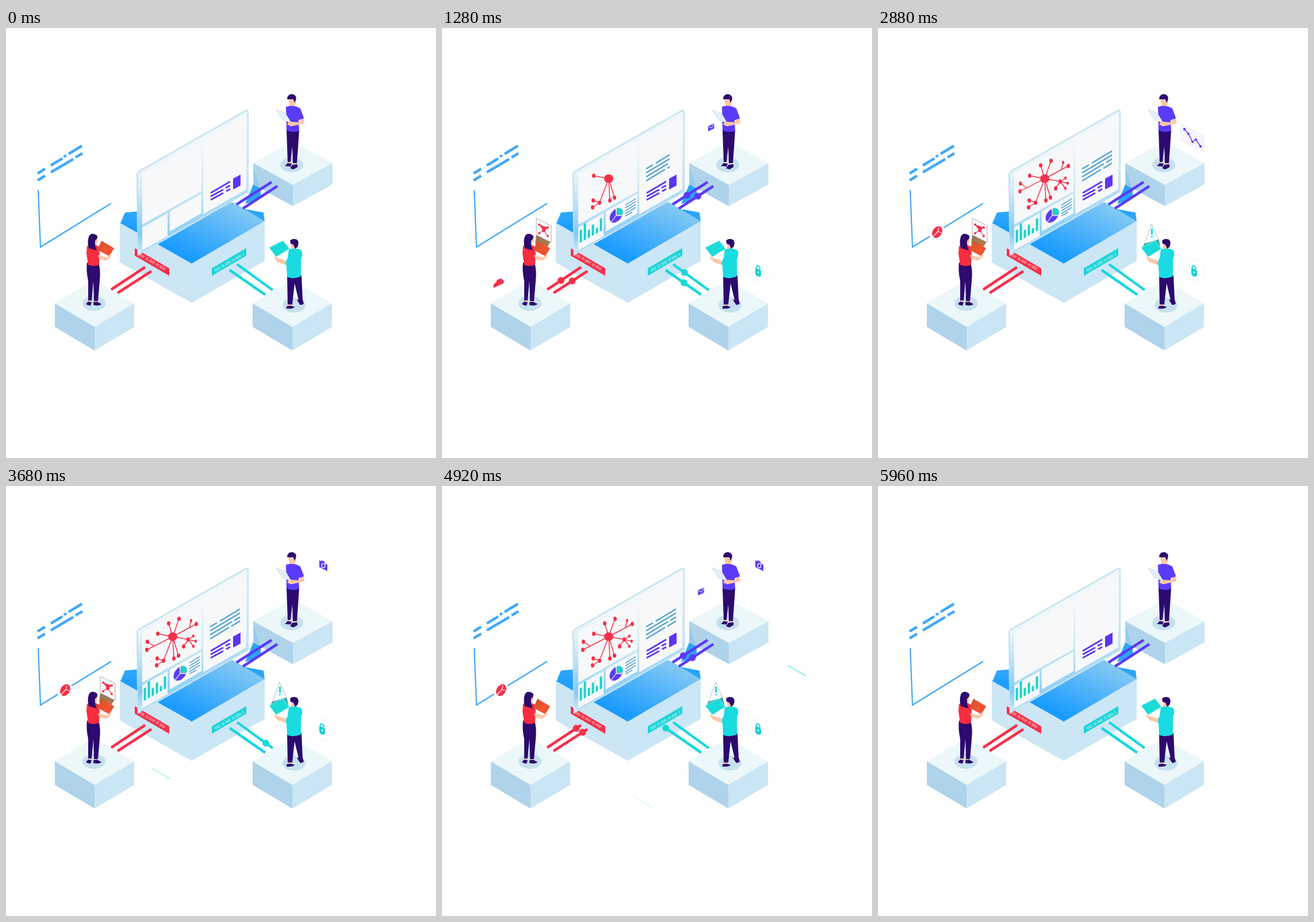
These frames come from a looping animation (748 by 748 pixels, 6 s). An HTML page:

```html
<!DOCTYPE html>
<html lang="en">
<head>
<meta charset="utf-8">
<title>Isometric dashboard</title>
<style>
html, body { margin: 0; width: 100%; height: 100%; overflow: hidden; background: #fff; }
svg { display: block; width: 100vw; height: 100vh; }
.line { fill: none; }
.pop { transform-box: fill-box; transform-origin: center; }
.grow { transform-origin: 290px 262px; }
.bar { transform-box: fill-box; transform-origin: bottom; }
.red { stroke: #f5304a; } .cyan { stroke: #19d7dc; } .violet { stroke: #5b3bf5; }
.skin { fill: #fdc6a6; } .dark { fill: #2c0a6e; }
</style>
</head>
<body>
<svg viewBox="0 0 748 748">
<defs>
  <linearGradient id="top" gradientUnits="userSpaceOnUse" x1="385" y1="298" x2="335" y2="405">
    <stop offset="0" stop-color="#86caf3"/><stop offset="1" stop-color="#1a9cff"/>
  </linearGradient>
  <linearGradient id="frame" gradientUnits="userSpaceOnUse" x1="310" y1="215" x2="345" y2="335">
    <stop offset="0" stop-color="#f1f7fa"/><stop offset=".5" stop-color="#d3eaf5"/><stop offset="1" stop-color="#93d2f7"/>
  </linearGradient>
  <linearGradient id="edge" x1="0" y1="0" x2="0" y2="1">
    <stop offset="0" stop-color="#d3eaf5" stop-opacity="0"/><stop offset=".75" stop-color="#7fcbf9"/><stop offset="1" stop-color="#d8eefa"/>
  </linearGradient>
  <linearGradient id="ember" x1="0" y1="0" x2="1" y2="1">
    <stop offset="0" stop-color="#c8502c"/><stop offset=".6" stop-color="#f2552f"/><stop offset="1" stop-color="#d64a34"/>
  </linearGradient>
  <linearGradient id="beam" x1="0" y1="0" x2="0" y2="1">
    <stop offset="0" stop-color="#8a7a5c"/><stop offset="1" stop-color="#c07a45"/>
  </linearGradient>
</defs>

<!-- side panel -->
<g class="line" stroke="#41a8fa">
  <path d="M56 282L60 381L183 305" stroke-width="2.2"/>
  <path d="M55 253L68 245M78 239L98 227M109 219L132 205M55 265L68 257M78 251L117 228M121 225L133 218" stroke-width="4.500"/>
  <path d="M100.500 224L105 221.500" stroke-width="4"/>
</g>

<g id="dashes" fill="none" stroke="#3fd9da" stroke-width="1.500"></g>

<!-- centre box -->
<g>
  <path d="M431 270L443 277V297L416 306Z" fill="#2ba5f8"/>
  <path d="M200 337L207 321L230 319V334ZM400 312L448 321L450 336Z" fill="#2ba5f8"/>
  <path d="M198 339L228 321L395 303L450 336L323 410Z" fill="url(#top)"/>
  <path d="M198 339L323 410V478L198 408Z" fill="#cce6f3"/>
  <path d="M450 336L323 410V478L450 405Z" fill="#cbe6f5"/>
  <path d="M224 383L284 418V431L224 396Z" fill="#f5304a"/>
  <path d="M231 393L279 421" class="line" stroke="#f77485" stroke-width="5" stroke-dasharray="11 3 5 2"/>
  <path d="M358 418L418 383V396L358 431Z" fill="#19d5d9"/>
  <path d="M363 422L414 393" class="line" stroke="#66dfe1" stroke-width="5" stroke-dasharray="11 3 5 2"/>
</g>
<g id="platforms"></g>
<path d="M431 243L442 278L431 271Z" fill="#94cbee"/>
<g id="links" class="line" stroke-width="4.600"></g>
<g id="dots"></g>

<!-- screen -->
<path d="M228 256Q228 252 232 249L417 144Q421 142 421 147V285L230 394Z" fill="url(#frame)" stroke="#c7e3f1" stroke-width="2.600"/>
<path d="M228 254L237 251V387L230 394Z" fill="url(#edge)"/>
<g fill="#f7f8f9">
  <path d="M237 254L340 197V284L237 342ZM343 195L418 151V281L343 324Z"/>
  <path d="M237 347L281 322V362L237 387ZM285 319L340 288V322L285 354Z"/>
</g>
<g class="violet" stroke-width="3">
  <path d="M356 287L390 267M356 293L378 281M382 278L390 274M356 299L378 287M383 284L390 280"/>
  <path d="M395 262L408 255V274L395 281Z" fill="#5b35f7" stroke="none"/>
</g>
<g id="bars" fill="#1dd3c8"></g>
<g id="pie">
  <g transform="translate(303 326) skewY(-24)">
    <circle r="11.500" fill="#5b3bf5"/>
    <path d="M1 -1V-12A12 12 0 0 1 11 4Z" fill="#21d3c4"/>
    <path d="M0 0V-12M0 0L11 5M0 0L-9 8" stroke="#f7f8f9" stroke-width="1.500"/>
  </g>
</g>
<path id="notes" d="M319 308L337 297M319 313L337 302M319 318L337 307M319 323L337 312M319 327L331 320" stroke="#62abd5" stroke-width="2"/>
<path id="copy" d="M355 245L367 238M372 235L407 214M355 252L407 221M355 259L393 236M397 234L407 228M355 266L388 246M392 244L407 235" fill="none" stroke="#53a3d1" stroke-width="2.600"/>
<g id="net" class="red" fill="#f5304a" stroke-width="1.500"></g>

<g id="mail"><path d="M-5 -1L5.500 -6V3L-5 8Z" fill="#5b3bf5"/><path d="M-4 0L1 2L5 -5" fill="none" stroke="#fff"/></g>

<!-- woman with laptop -->
<g>
  <ellipse cx="153" cy="479" rx="20" ry="13" fill="#c6e0ef"/>
  <path class="skin" d="M144 470h5v10h-5zM153 470h6v10h-6zM155 363q6 2 4 8l-2 7h-6v-12z"/>
  <path class="dark" d="M141 408L161 409Q165 420 163 440L160 475H153L152 440L149 474H143L143 440Q139 422 141 408ZM143 476L149 477L147 483Q141 482 139 480ZM152 477L158 476L166 480Q163 484 152 482Z"/>
  <path d="M141 379Q152 374 161 380L163 392L162 412Q152 416 143 412L140 392Z" fill="#f62d3f"/>
  <path class="dark" d="M144 363Q147 356 155 359Q161 361 158 367L155 370Q154 380 158 387L144 383Q141 372 144 363Z"/>
  <g id="holoRed">
    <path d="M164 359L189 372L181 384L162 375Z" fill="url(#beam)"/>
    <path d="M164 331L190 344V373L164 360Z" fill="#fafafa" stroke="#a9adb1"/>
    <g class="red" fill="#f5304a" stroke-width="1.200">
      <path d="M169 342L177 352L184 347M177 352L169 357M177 352L184 362"/>
      <circle cx="177" cy="352" r="3" stroke="none"/><circle cx="169" cy="342" r="1.300"/><circle cx="184" cy="347" r="1.300"/><circle cx="169" cy="357" r="1.300"/><circle cx="184" cy="362" r="1.300"/>
    </g>
  </g>
  <path d="M166 370L188 383L180 397L159 386Z" fill="url(#ember)"/>
  <path class="skin" d="M160 395L176 399L184 390L182 399L174 405L162 402Z"/>
</g>

<!-- man with paper -->
<g>
  <ellipse cx="497" cy="238" rx="20" ry="13" fill="#c6e0ef"/>
  <path class="skin" d="M490 228h5v9h-5zM499 230h6v9h-6zM491 124L504 121V131L501 138H494Z"/>
  <path class="dark" d="M488 177L510 178L508 208L506 235H499L498 206L495 233H490L489 205ZM490 235L497 236L495 241L485 240ZM498 238L507 237V242L500 246L494 244Z"/>
  <path d="M487 137Q501 133 512 140L518 156L516 160L509 160L510 179Q498 183 488 178Z" fill="#5b3bfa"/>
  <path class="dark" d="M489 124Q489 115 498 115Q507 117 504 126L502 130L500 124Z"/>
  <path d="M469 142L486 148L496 165L481 160Z" fill="#e2eef9" stroke="#cbdff2" stroke-width=".7"/>
  <path class="skin" d="M511 159L518 158L519 166L496 171L489 168L492 163L511 164Z"/>
</g>

<!-- man with tablet -->
<g>
  <ellipse cx="501" cy="482" rx="20" ry="13" fill="#c6e0ef"/>
  <path class="skin" d="M490 476h6v9h-6zM508 470h6v8h-6zM495 373L504 376L503 387H497Z"/>
  <path class="dark" d="M489 430L514 430L516 473H509L502 444L498 481H490ZM488 484L495 483L502 485Q500 489 488 488ZM506 473L516 472L518 480L512 482Z"/>
  <path d="M492 385Q506 381 514 387Q517 393 513 403L513 432Q501 438 489 433L488 413L485 409L490 400Z" fill="#1adbe1"/>
  <path class="dark" d="M494 370Q498 365 506 368Q511 372 507 381L503 384L500 377L495 375Z"/>
  <g id="holoCyan">
    <path d="M464 373L488 366L491 380L469 394L460 382Z" fill="#3aa9ab"/>
    <path d="M476 341L488 368L464 375Z" fill="#f7fcfc" stroke="#a9c9ca"/>
    <path d="M476.500 349V359M476.500 361.500V364" class="cyan" stroke-width="3"/>
  </g>
  <path d="M458 382L482 370L493 384L470 398Z" fill="#19dcd8" stroke="#8cebe7"/>
  <path class="skin" d="M465 397L475 401L488 405L486 412L472 407Z"/>
</g>

<!-- floating badges -->
<g id="cloud" class="pop">
  <circle cx="99" cy="444" r="15" fill="#fff"/>
  <path d="M90 452Q88 445 94 443Q95 436 100 437Q104 434 105 438Q109 439 107 444Z" fill="#f5304a"/>
</g>
<g id="chart" class="pop">
  <circle cx="103" cy="356" r="14" fill="#fff"/>
  <ellipse cx="103" cy="355" rx="8" ry="11" transform="rotate(32 103 355)" fill="#f5304a"/>
  <path d="M96 363L104 354L106 347M104 354L110 356" class="line" stroke="#fff" stroke-width="1.200"/>
</g>
<g id="lock" class="pop">
  <ellipse cx="552" cy="423" rx="15.500" ry="20" fill="#fff" stroke="#f4f5f6" transform="rotate(-15 552 423)"/>
  <path d="M546.500 420V417Q547 412 550.500 414Q553 416 553 421" class="line cyan" stroke-width="2"/>
  <path d="M545 418Q550 418 555 423V430Q553 434 549 432Q545 430 545 426Z" fill="#19cfd5"/><circle cx="550" cy="425" r="1.600" fill="#fff"/>
</g>
<g id="camera" class="pop">
  <ellipse cx="552" cy="138" rx="14" ry="18" fill="#fff" stroke="#f6f6f8" transform="rotate(-15 552 138)"/>
  <path d="M545 129L548 131L549 129L554 132L555 135L559 137V148L545 141Z" fill="#5b3bf5"/>
  <ellipse cx="552" cy="138.500" rx="3" ry="3.600" fill="#5b3bf5" stroke="#fff" stroke-width="1.300"/>
</g>
<g id="graph" class="pop">
  <path d="M527 167L567 188V215L527 196Z" fill="#f4f6fc" stroke="#eaeef7"/>
  <path d="M533 176L540 184L547 198L553 194L561 206" class="line violet" stroke-width="1.500"/>
  <g fill="#5b3bf5"><circle cx="533" cy="176" r="2.200"/><circle cx="540" cy="184" r="2"/><circle cx="547" cy="198" r="2"/><circle cx="553" cy="194" r="2"/><circle cx="561" cy="206" r="2.200"/></g>
</g>
</svg>
<script>
const LOOP = 6000;
const $ = id => document.getElementById(id);

function add(parent, tag, attrs) {
  const el = document.createElementNS('http://www.w3.org/2000/svg', tag);
  for (const key in attrs) el.setAttribute(key, attrs[key]);
  return parent.appendChild(el);
}

// steps: [time in ms, properties]
function play(el, steps) {
  const frames = steps.map(([t, props]) => ({ offset: t / LOOP, ...props }));
  const first = frames[0], last = frames[frames.length - 1];
  if (first.offset > 0) frames.unshift({ ...first, offset: 0 });
  if (last.offset < 1) frames.push({ ...last, offset: 1 });
  el.animate(frames, { duration: LOOP, iterations: Infinity, delay: 20, fill: 'backwards' });
}

function show(el, from, to, off = { opacity: 0 }, on = { opacity: 1 }, time = 200) {
  play(el, [[from, { ...off, easing: 'ease-out' }], [from + time, on], [to, on], [Math.min(to + time, LOOP), off]]);
}

const small = { opacity: 0, transform: 'scale(.2)' };
const full = { opacity: 1, transform: 'scale(1)' };
const shift = (x, y) => `translate(${x}px, ${y}px)`;

// platforms: x, y of the top's centre, half height, depth
for (const [x, y, h, d] of [[154, 479, 41, 41], [499, 235, 38, 37], [498, 479, 41, 41]]) {
  const face = (path, fill) => add($('platforms'), 'path', { d: path, fill });
  face(`M${x - 69} ${y}L${x} ${y - h}L${x + 69} ${y}L${x} ${y + h}Z`, '#ecf7f9');
  face(`M${x - 69} ${y}L${x} ${y + h}v${d}l-69 ${-h}Z`, '#afd3ea');
  face(`M${x + 69} ${y}L${x} ${y + h}v${d}l69 ${-h}Z`, '#cae5f4');
}

// links: colour, outer end, inner end, two runs of the travelling dot
const links = [
  ['red', 183, 455, 242, 416, 700, 2080, 3700, 5100],
  ['red', 194, 461, 253, 423, 350, 2000, 3700, 5100],
  ['cyan', 451, 464, 389, 421, 450, 2130, 3700, 4840],
  ['cyan', 464, 456, 402, 411, 450, 1640, 3430, 4620],
  ['violet', 462, 268, 401, 307, 450, 1830, 3950, 5320],
  ['violet', 472, 275, 412, 314, 700, 1950, 4180, 5370]
];
const tint = { red: '#f5304a', cyan: '#19d7dc', violet: '#5b3bf5' };
for (const [name, x, y, bx, by, ...runs] of links) {
  add($('links'), 'path', { d: `M${x} ${y}L${bx} ${by}`, class: name });
  const dot = add($('dots'), 'circle', { r: 6, fill: tint[name] });
  const a = shift(x, y), b = shift(bx, by), steps = [];
  for (const i of [0, 2]) {
    const [from, to] = [runs[i], runs[i + 1]];
    steps.push([from, { opacity: 0, transform: a }], [from + 1, { opacity: 1, transform: a }],
      [to, { opacity: 1, transform: b }], [to + 90, { opacity: 1, transform: b }],
      [to + 91, { opacity: 0, transform: b }]);
  }
  play(dot, steps);
}

// drifting dashes: path, start, end, shift at start, shift at end
for (const [d, from, to, ax, ay, bx, by] of [
  ['M78 441L109 460', 1760, 2520, -21, -13, 30, 18],
  ['M254 491L286 510', 3240, 5120, -29, -18, 95, 59],
  ['M560 287L591 305', 4440, 5760, 75, 45, -20, -12],
  ['M516 465L547 446', 4000, 4600, 24, -15, -16, 10]
]) {
  play(add($('dashes'), 'path', { d }), [
    [from, { opacity: 0, transform: shift(ax, ay) }],
    [(from + to) / 2, { opacity: 1, transform: shift((ax + bx) / 2, (ay + by) / 2) }],
    [to, { opacity: 0, transform: shift(bx, by) }]]);
}

// bar chart
[22, 29, 14, 19, 9, 22].forEach((h, i) => {
  const x = 239.5 + i * 7, y = 374 - i * 4;
  const bar = add($('bars'), 'path', { d: `M${x} ${y - h}l4 -2v${h}l-4 2Z`, class: 'bar' });
  play(bar, [[300 + i * 90, { transform: 'scaleY(0)' }], [650 + i * 90, { transform: 'scaleY(1)' }]]);
});

// network branches: start, edges, nodes as x, y, radius
const branches = [
  [650, 'M290 262L264 257', [[264, 257, 3]]],
  [800, 'M290 262L292 300M290 262L300 295', [[292, 300, 3], [300, 295, 3]]],
  [900, 'M290 262L274 304L263 300M274 304L262 312', [[274, 304, 3], [263, 300, 3], [262, 312, 3]]],
  [1340, 'M290 262L283 239M290 262L301 231', [[283, 239, 3], [301, 231, 3]]],
  [1640, 'M290 262L331 240M319 246L322 234', [[331, 240, 3], [322, 234, 2]]],
  [2200, 'M290 262L317 267L326 261M317 267L330 270M317 267L309 279M317 267L326 279', [[317, 267, 3], [326, 261, 2], [330, 270, 2], [309, 279, 3], [326, 279, 2]]],
  [2600, 'M290 262L245 285M258 279L246 271', [[245, 285, 3], [246, 271, 3]]]
];
for (const [start, d, nodes] of branches) {
  const g = add($('net'), 'g', { class: 'grow' });
  add(g, 'path', { d, fill: 'none' });
  for (const [cx, cy, r] of nodes) add(g, 'ellipse', { cx, cy, rx: r, ry: r + .8, stroke: 'none' });
  show(g, start, 5600, small, full, 320);
}
show(add($('net'), 'ellipse', { cx: 290, cy: 262, rx: 8, ry: 7.5, class: 'grow', stroke: 'none' }), 450, 5640, small, full, 240);

show($('pie'), 750, 5560);
show($('notes'), 900, 5560);
const shut = { clipPath: 'inset(0 100% 0 0)' }, open = { clipPath: 'inset(0 0% 0 0)' };
play($('copy'), [[680, shut], [1440, open], [5560, open], [5860, shut]]);

show($('cloud'), 760, 2360, small, full);
show($('chart'), 1700, 5120, small, full);
show($('lock'), 700, 5720, small, full);
show($('camera'), 3240, 5720, small, full);
show($('graph'), 1640, 2900, small, full);
show($('holoRed'), 960, 3960);
show($('holoCyan'), 1700, 5000);

const mail = (x, y, opacity = 1) => ({ transform: shift(x, y), opacity });
play($('mail'), [
  [900, mail(484, 169, 0)], [1080, mail(476, 170)], [1280, mail(467, 172)], [2080, mail(431, 179)], [2260, mail(423, 181, 0)],
  [4000, mail(485, 178, 0)], [4160, mail(479, 179)], [4360, mail(471, 180)], [5480, mail(428, 185)], [5640, mail(422, 186, 0)]]);
</script>
</body>
</html>
```
